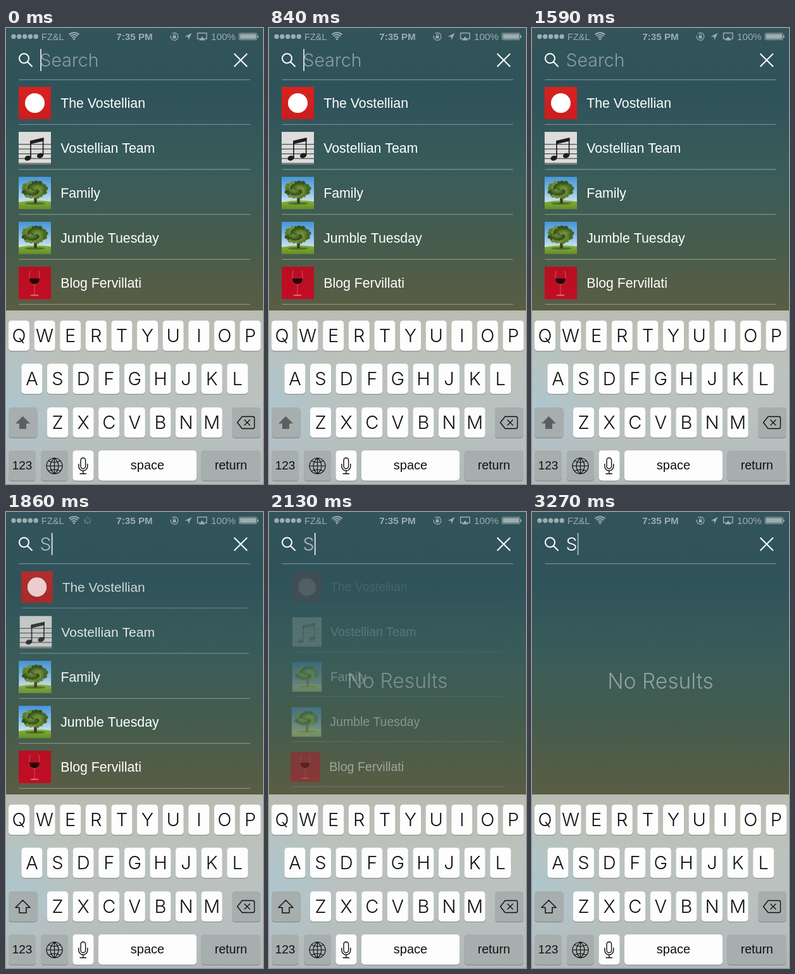
An HTML page with a canvas for the animation above (3.3 s loop, 406 by 720 pixels).

```html
<!DOCTYPE html>
<html lang="en">
<head>
<meta charset="utf-8">
<title>Playlist search</title>
<style>
html, body { margin: 0; width: 100%; height: 100%; overflow: hidden; background: #2f525a; }
canvas { display: block; width: 406px; height: 720px; }
</style>
</head>
<body>
<canvas id="stage"></canvas>
<script>
const W = 406, H = 720, LOOP = 3300, TYPED = 1680;
const SANS = '"Liberation Sans", Arial, sans-serif';
const LIGHT = 'Inter, "Liberation Sans", sans-serif';
const canvas = document.getElementById('stage');
const c = canvas.getContext('2d');
const dpr = window.devicePixelRatio || 1;
canvas.width = W * dpr;
canvas.height = H * dpr;

const clamp = x => Math.max(0, Math.min(1, x));
const ramp = (t, a, b) => clamp((t - a) / (b - a));
const ease = (t, a, b) => { const u = ramp(t, a, b); return u * u * (3 - 2 * u); };
const white = a => `rgba(255,255,255,${a})`;

function text(s, x, y, font, color, align = 'left') {
  c.font = font;
  c.fillStyle = color;
  c.textAlign = align;
  c.fillText(s, x, y);
}

function box(x, y, w, h, r, color) {
  c.fillStyle = color;
  c.beginPath();
  c.roundRect(x, y, w, h, r);
  c.fill();
}

function disc(x, y, rx, color, ry = rx, turn = 0) {
  c.fillStyle = color;
  c.beginPath();
  c.ellipse(x, y, rx, ry, turn, 0, 7);
  c.fill();
}

function stroke(path, width, color) {
  c.lineWidth = width;
  c.strokeStyle = color;
  c.stroke(new Path2D(path));
}

function fill(path, color) {
  c.fillStyle = color;
  c.fill(new Path2D(path));
}

function shade(y0, y1, ...colors) {
  const g = c.createLinearGradient(0, y0, 0, y1);
  colors.forEach((k, i) => g.addColorStop(i / (colors.length - 1), k));
  return g;
}

function scaled(x, y, k, alpha, draw) {
  c.save();
  c.globalAlpha *= alpha;
  c.translate(x, y);
  c.scale(k, k);
  draw();
  c.restore();
}

// Covers are drawn in a 51 x 51 square
function dotCover() {
  box(0, 0, 51, 51, 0, shade(0, 51, '#d8231f', '#cc1c1d'));
  disc(25.5, 25.5, 15.5, '#fff');
}

function noteCover() {
  box(0, 0, 51, 51, 0, '#dcdcda');
  for (let y = 19; y < 51; y += 7.5) box(0, y, 51, 1.2, 0, '#4a4a4a');
  fill('M18 14 L39.5 9 V14.5 L18 19.5Z', '#1d1d1d');
  stroke('M19 14 V41 M38.6 10 V37', 1.7, '#1d1d1d');
  disc(14.5, 41.5, 5.2, '#1d1d1d', 3.8, -0.3);
  disc(34, 37.5, 5.2, '#1d1d1d', 3.8, -0.3);
}

function treeCover() {
  box(0, 0, 51, 51, 0, shade(0, 40, '#4595d8', '#7db9e6', '#cfe4ec'));
  fill('M0 40 Q25 35 51 39 V51 H0Z', shade(36, 51, '#8db23c', '#618f28'));
  disc(26, 42, 16, '#4f732a', 2);
  fill('M24 29 L24.5 42 H28.5 L29 29Z', '#42381f');
  const greens = ['#36501c', '#466524', '#5d7d2e', '#6f8d3a'];
  for (let i = 0; i < 70; i++) {
    const a = i * 2.4, r = Math.sqrt(i / 70);
    const x = 25 + 19 * r * Math.cos(a), y = 20 + 13 * r * Math.sin(a);
    disc(x, y, 3.2, greens[(i * 7 + (y < 18 ? 1 : 0)) % 4], 2.6);
  }
}

function wineCover() {
  box(0, 0, 51, 51, 0, shade(0, 51, '#b80f22', '#c20d24'));
  stroke('M18.5 6 C15 18 17 27 25 28 C33 27 35 18 31.5 6 M25 28 V44', 0.8, '#d8686f');
  fill('M16.8 18.5 H33.2 C33 24 30 27.5 25 27.5 C20 27.5 17 24 16.8 18.5Z', '#28060c');
  disc(25, 45, 7, 'rgba(235,160,160,.6)', 1.3);
}

const rows = [
  ['The Vostellian', dotCover],
  ['Vostellian Team', noteCover],
  ['Family', treeCover],
  ['Jumble Tuesday', treeCover],
  ['Blog Fervillati', wineCover]
];

function drawRows(t) {
  rows.forEach(([name, cover], i) => {
    const start = 1765 + 36 * i;
    const alpha = 1 - ramp(t, start, start + 405);
    if (!alpha) return;
    const k = 1 - 0.092 * ease(t, start, start + 300);
    scaled(203, 118.5 + 71 * i, k, alpha, () => {
      c.save();
      c.translate(-183, -25.5);
      cover();
      c.restore();
      text(name, -116.8, 7.5, '21.3px ' + SANS, '#fff');
      box(-182.5, 33.3, 365, 1.2, 0, white(0.32));
    });
  });
}

function drawStatus(t) {
  const ink = white(0.52);
  for (let i = 0; i < 5; i++) disc(12 + 8.8 * i, 13.5, 3.7, ink);
  text('FZ&L', 56, 18.5, '14.6px ' + SANS, ink);
  for (const r of [4.5, 8, 11.2]) {
    c.lineWidth = 2;
    c.strokeStyle = ink;
    c.beginPath();
    c.arc(107.5, 18.5, r, -Math.PI * 0.75, -Math.PI * 0.25);
    c.stroke();
  }
  disc(107.5, 17.5, 1.6, ink);
  const busy = t < 2300
    ? ease(t, 1710, 1770) * (1 - ease(t, 2010, 2070))
    : ease(t, 2400, 2460) * (1 - ease(t, 2850, 2910));
  if (busy) drawSpinner(t, busy);
  text('7:35 PM', 203, 18.5, 'bold 15.2px ' + SANS, ink, 'center');

  c.lineWidth = 1.3;
  c.strokeStyle = ink;
  c.beginPath();
  c.arc(266, 13.5, 5.9, -2.3, 3.4);
  c.stroke();
  box(263.5, 12.5, 5, 4, 0.5, ink);
  stroke('M264.5 13 V11.5 A1.5 1.5 0 0 1 267.5 11.5 V13', 1, ink);
  fill('M293.5 8 L282.5 13.6 L287.7 14 L288.2 19Z', ink);
  stroke('M306 17 H302.5 V8 H317 V17 H313.5', 1.4, ink);
  fill('M309.8 13.5 L315 19.5 H304.6Z', ink);
  text('100%', 324, 18.5, '15.2px ' + SANS, ink);
  stroke('M369.5 8.2 H395 Q396.3 8.2 396.3 9.5 V17.3 Q396.3 18.6 395 18.6 H369.5 Q368.2 18.6 368.2 17.3 V9.5 Q368.2 8.2 369.5 8.2Z', 0.9, ink);
  box(369.5, 9.5, 25.5, 7.8, 0.5, ink);
  box(397, 11.5, 1.8, 4, 0.8, ink);
}

function drawSpinner(t, alpha) {
  const lead = Math.floor(t / 83);
  for (let i = 0; i < 8; i++) {
    c.save();
    c.translate(129, 13);
    c.rotate(i * Math.PI / 4);
    const age = (((lead - i) % 8) + 8) % 8;
    box(-0.6, -6.2, 1.2, 3.4, 0.6, white(alpha * (0.6 - 0.06 * age)));
    c.restore();
  }
}

function caretAlpha(t) {
  if (t < TYPED) return t < 500 ? 1 - ramp(t, 240, 330) : ramp(t, 600, 690) * (1 - ramp(t, 1080, 1170));
  return t < 2600 ? 1 - ramp(t, 2400, 2490) : ramp(t, 2790, 2880) * (1 - ramp(t, 3240, 3330));
}

function drawSearch(t) {
  c.lineCap = 'round';
  stroke('M36 48 A7.5 7.5 0 1 1 21 48 A7.5 7.5 0 1 1 36 48 M34 53.5 L41 60.5', 2, '#fff');
  c.lineCap = 'butt';
  stroke('M360.5 40.5 L381 61 M381 40.5 L360.5 61', 2, '#fff');
  const font = '300 28.5px ' + LIGHT;
  const typed = t >= TYPED;
  if (typed) text('S', 53.5, 61, font, white(0.62 + 0.38 * ease(t, 2750, 3100)));
  else text('Search', 53.5, 61, font, white(0.44));
  box(typed ? 71.8 : 54.2, 33, 1.8, 35, 0.5, white(0.85 * caretAlpha(t)));
  box(20.5, 81, 365, 1.2, 0, white(0.34));
}

function drawEmpty(t) {
  const p = ease(t, 1980, 2280);
  if (!p) return;
  scaled(203, 267, 0.9 + 0.1 * p, Math.min(1, p * 1.5), () =>
    text('No Results', 0, 12, '300 33.5px ' + LIGHT, white(0.43), 'center'));
}

function key(x, y, w, label, size, dark) {
  box(x, y + 1, w, 48, 5, dark ? '#868c8c' : '#8b9090');
  box(x, y, w, 47.8, 5, dark ? '#a7aeae' : '#fcfdfc');
  if (!label) return;
  const caps = size > 25;
  const font = caps ? `300 ${size}px ${LIGHT}` : `${size}px ${SANS}`;
  text(label, x + w / 2, y + 24 + size * (caps ? 0.36 : 0.32), font, '#111', 'center');
}

function drawKeyboard(t) {
  box(0, 446, W, 274, 0, shade(446, 720, '#b9bcb1', '#bcc2bc', '#b9c1c0', '#b2b9ba'));
  const tint = c.createRadialGradient(0, 590, 0, 0, 590, 120);
  tint.addColorStop(0, 'rgba(165,200,215,.6)');
  tint.addColorStop(1, 'rgba(165,200,215,0)');
  box(0, 446, 130, 274, 0, tint);

  [['QWERTYUIOP', 4, 462], ['ASDFGHJKL', 24.4, 530], ['ZXCVBNM', 65, 599]].forEach(([keys, x, y]) =>
    [...keys].forEach((k, i) => key(x + 40.6 * i, y, 33, k, 29)));
  key(4, 599, 45.5, '', 0, true);
  key(357, 599, 45, '', 0, true);
  key(4, 667, 43, '123', 19, true);
  key(55, 667, 43, '', 0, true);
  key(105.5, 667, 33, '');
  key(146, 667, 155, 'space', 20);
  key(308.5, 667, 93.5, 'return', 19.6, true);

  c.lineJoin = 'round';
  const arrow = 'M26.5 613 L38 624.5 H32 V633 H21 V624.5 H15Z';
  if (t < TYPED) fill(arrow, '#596061');
  else stroke(arrow, 1.5, '#111');
  stroke('M373 613.5 H390 Q392.5 613.5 392.5 616 V630 Q392.5 632.5 390 632.5 H373 L365.5 623Z M376.5 618.5 L385.5 627.5 M385.5 618.5 L376.5 627.5', 1.4, '#111');
  stroke('M89 691.5 A12.5 12.5 0 1 1 64 691.5 A12.5 12.5 0 1 1 89 691.5 M64 691.5 H89 M76.5 679 V704 M76.5 679 C68 686 68 697 76.5 704 M76.5 679 C85 686 85 697 76.5 704 M67 683.5 Q76.5 688 86 683.5 M67 699.5 Q76.5 695 86 699.5', 1.2, '#111');
  stroke('M118 682.5 A3.8 3.8 0 0 1 125.6 682.5 V692 A3.8 3.8 0 0 1 118 692Z M114.8 688 V692 A7 7 0 0 0 128.8 692 V688 M121.8 699 V703.5 M116.5 703.8 H127', 1.4, '#111');
  c.lineJoin = 'miter';
}

function draw(t) {
  c.setTransform(dpr, 0, 0, dpr, 0, 0);
  box(0, 0, W, 446, 0, shade(0, 446, '#32545a', '#2f535a', '#395c5a', '#455c4d', '#5a5d43'));
  drawStatus(t);
  drawSearch(t);
  drawRows(t);
  drawEmpty(t);
  drawKeyboard(t);
}

function frame() {
  draw(performance.now() % LOOP);
  requestAnimationFrame(frame);
}
frame();
</script>
</body>
</html>
```
